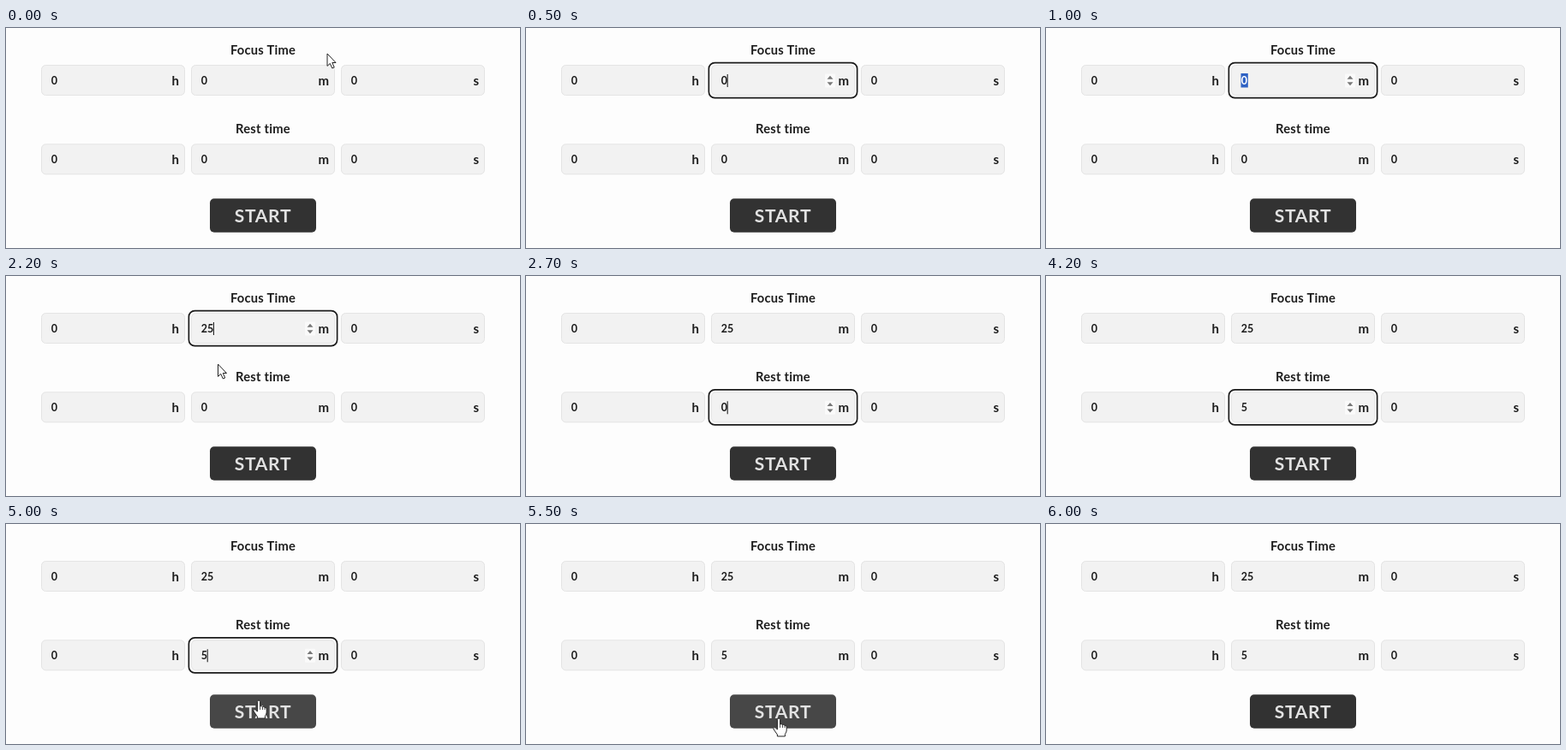
An HTML page for the animation above (7100 ms loop, 600 px wide and 257 px high).

```html
<!DOCTYPE html>
<html lang="en">
<head>
<meta charset="utf-8">
<title>Focus timer</title>
<style>
  html, body { margin: 0; width: 100%; height: 100%; overflow: hidden; background: #fdfdfd; }
  svg { display: block; width: 100vw; height: 100vh; }
  text { font-family: Lato, "Open Sans", sans-serif; font-weight: 700; font-variant-ligatures: none; fill: #1c1c1c; }
  .label { font-size: 14.7px; letter-spacing: .25px; }
  .unit { font-size: 15px; }
  .value { font-size: 12.5px; }
  .label, .start { text-anchor: middle; }
  .unit { text-anchor: end; }
  .start { font-size: 21px; letter-spacing: .7px; fill: #e2e2e2; }
  .field { fill: #f2f2f2; stroke: #e4e4e4; }
  .ring { fill: none; stroke: #1a1a1a; stroke-width: 1.7; }
  .pointer { fill: #fff; stroke: #222; stroke-linejoin: round; }
</style>
</head>
<body>
<svg id="stage" viewBox="0 0 600 257">
  <rect width="600" height="257" fill="#fdfdfd"/>
</svg>
<script>
const LOOP = 7100, STEP = 100;
const stage = document.getElementById('stage');

function add(parent, tag, attrs, text) {
  const el = document.createElementNS('http://www.w3.org/2000/svg', tag);
  for (const key in attrs) el.setAttribute(key, attrs[key]);
  if (text !== undefined) el.textContent = text;
  parent.appendChild(el);
  return el;
}
const show = (el, on) => el.setAttribute('visibility', on ? 'visible' : 'hidden');
const within = (t, from, to) => t >= from && t < to;

function makeRow(title, y) {
  const g = add(stage, 'g', { transform: `translate(0 ${y})` });
  add(g, 'text', { class: 'label', x: 300, y: 31 }, title);
  const cells = ['h', 'm', 's'].map((unit, i) => {
    const x = 41 + 175 * i;
    add(g, 'rect', { class: 'field', x: x + .5, y: 43.5, width: 167, height: 35, rx: 5 });
    add(g, 'text', { class: 'unit', x: x + 161, y: 67 }, unit);
    return x;
  });
  const ring = add(g, 'rect', { class: 'ring', x: 213.4, y: 40.6, width: 173.2, height: 41, rx: 7 });
  const spin = add(g, 'g', {});
  add(spin, 'rect', { x: 349, y: 53.5, width: 12, height: 16, rx: 1, fill: '#fafafa' });
  add(spin, 'path', { d: 'M351.5 59.7L355 55.7L358.5 59.7ZM351.5 63.2L355 67.2L358.5 63.2Z', fill: '#777' });
  const mark = add(g, 'rect', { x: 227.5, y: 53, width: 8.3, height: 16.5, fill: '#2f62c4' });
  const values = cells.map(x => add(g, 'text', { class: 'value', x: x + 11.8, y: 66 }, '0'));
  const caret = add(g, 'rect', { y: 54, width: 1, height: 15, fill: '#111' });
  return { ring, spin, mark, caret, minutes: values[1] };
}

function drawRow(row, s) {
  row.minutes.textContent = s.value;
  row.minutes.style.fill = s.marked ? '#fff' : '';
  row.caret.setAttribute('x', 227.5 + 7.2 * s.value.length);
  show(row.ring, s.focus);
  show(row.spin, s.focus || s.hover);
  show(row.mark, s.marked);
  show(row.caret, s.caret);
}

const focusRow = makeRow('Focus Time', 0);
const restRow = makeRow('Rest time', 92.3);

const button = add(stage, 'rect', { x: 238, y: 199.3, width: 124, height: 39.4, rx: 5 });
add(stage, 'text', { class: 'start', x: 300, y: 227.4 }, 'START');

const arrow = add(stage, 'path', {
  class: 'pointer',
  d: 'M0 0V14.4L3.3 11.4L5.8 17L8.2 16L5.8 10.5H10Z'
});
const hand = add(stage, 'g', { class: 'pointer' });
add(hand, 'path', {
  d: 'M-1.6 12V1.4Q-1.4 0 0 0T1.6 1.4V7Q3 5.9 4.4 7.5Q6 6.7 7 8.3Q9 7.8 9.2 10V14Q9.2 16 7.4 18.5V21H-1.6V19' +
     'L-5.8 13Q-6.6 11.2 -5.2 10.6Q-4 10.3 -1.6 13Z'
});
add(hand, 'path', { d: 'M1.6 7V11M4.5 7.5V11M7 8.3V11', 'stroke-width': .8 });

// Pointer trips over the page; over an input the pointer is not visible.
const trips = [
  [arrow, [0, 375, 30], [100, 368, 35], [200, 352, 41]],
  [arrow, [2100, 246, 86], [2200, 247.5, 103], [2300, 243, 119], [2400, 237, 133]],
  [arrow, [3100, 322, 176], [3200, 351, 184], [3300, 347, 177]],
  [arrow, [4800, 292, 173], [4900, 294, 186]],
  [hand, [5000, 295, 206], [5200, 295, 226], [5300, 295, 229], [5400, 295, 228], [5500, 295, 227], [5700, 295, 227], [5800, 330, 212]],
  [arrow, [5900, 420, 172]]
];

function placePointer(t) {
  show(arrow, false);
  show(hand, false);
  for (const [el, ...path] of trips) {
    if (!within(t, path[0][0], path[path.length - 1][0] + STEP)) continue;
    const i = path.findLastIndex(p => p[0] <= t);
    const a = path[i], b = path[i + 1] || a;
    const k = b === a ? 0 : (t - a[0]) / (b[0] - a[0]);
    const mix = n => a[n] + (b[n] - a[n]) * k;
    el.setAttribute('transform', `translate(${mix(1)} ${mix(2)})`);
    show(el, true);
  }
}

function draw(t) {
  drawRow(focusRow, {
    value: t < 1800 ? '0' : t < 2000 ? '2' : '25',
    hover: within(t, 300, 2100),
    focus: within(t, 500, 2600),
    marked: within(t, 800, 1800),
    caret: within(t, 500, 800) || within(t, 1800, 2500)
  });
  drawRow(restRow, {
    value: t < 3600 ? '0' : '5',
    hover: within(t, 2500, 3100),
    focus: within(t, 2600, 5300),
    marked: within(t, 2800, 3600),
    caret: within(t, 2600, 2800) || within(t, 3600, 4200) || within(t, 4600, 5200)
  });
  button.setAttribute('fill', within(t, 5000, 5900) ? '#474747' : '#323232');
  placePointer(t);
}

const origin = performance.now();
function tick() {
  const t = (performance.now() - origin) % LOOP;
  draw(Math.floor(t / STEP) * STEP);
  requestAnimationFrame(tick);
}
tick();
</script>
</body>
</html>
```
